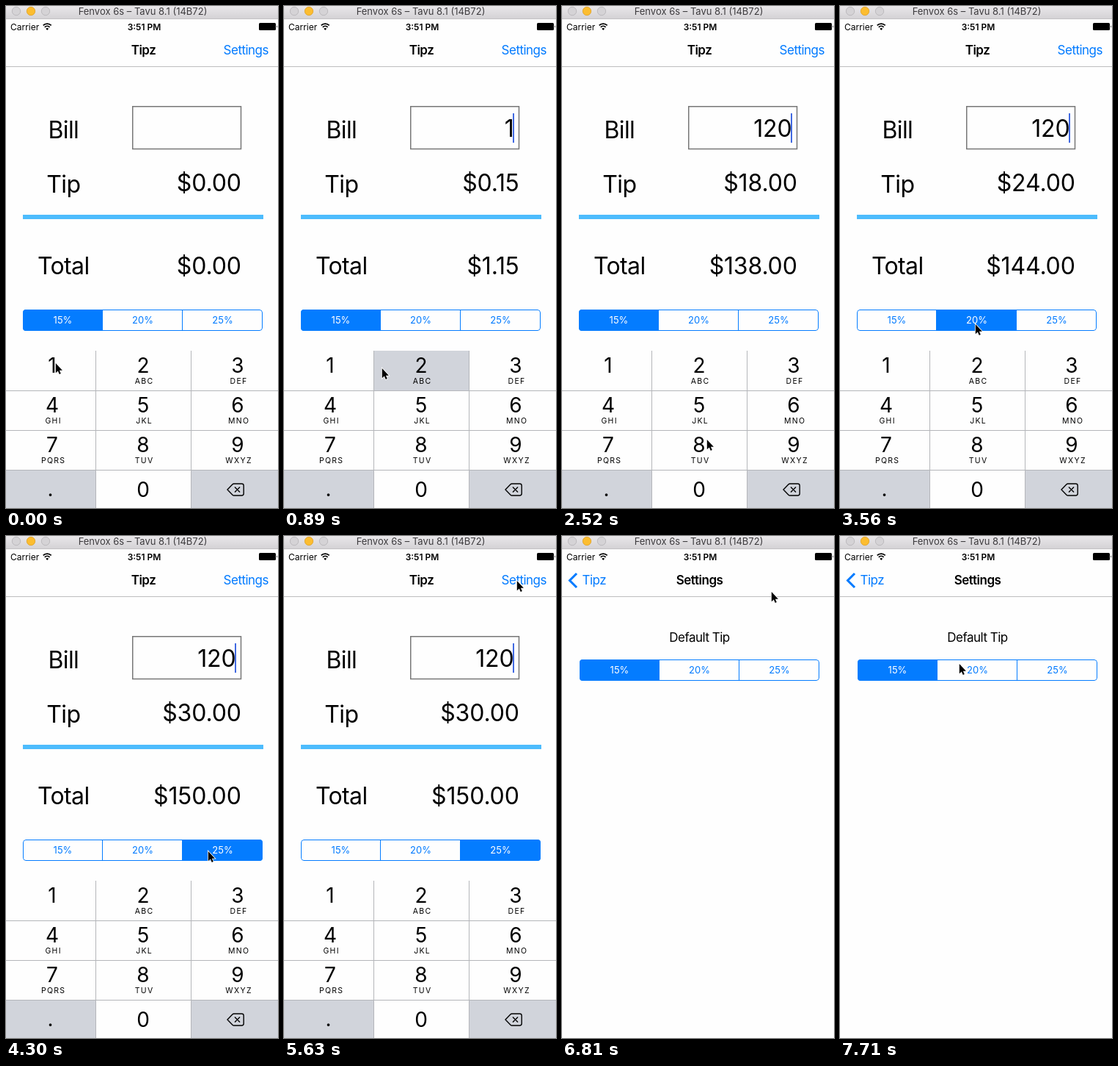
An HTML page that plays this animation: 371x683 px, repeating every 8000 ms.

```html
<!DOCTYPE html>
<html lang="en">
<head>
<meta charset="utf-8">
<title>Tip calculator</title>
<style>
  html, body { margin: 0; width: 100%; height: 100%; overflow: hidden; background: #fefefe; }
  svg { display: block; width: 100%; height: 100%; font-family: Inter, Roboto, sans-serif; }
  text { white-space: pre; }
  .mid { text-anchor: middle; }
  .end { text-anchor: end; }
  .big { font-size: 32px; letter-spacing: -.005em; }
  .big.mid { letter-spacing: -.02em; }
  .nav { font-size: 17px; letter-spacing: -.03em; }
  .bold { font-weight: 600; }
  .blue { fill: #007aff; }
  .small { font-size: 12px; }
  .seg text { font-size: 13px; text-anchor: middle; }
  .seg .line { fill: none; stroke: #047cff; }
  .digit { font-size: 28px; text-anchor: middle; }
  .letters { font-size: 10.5px; letter-spacing: 1.3px; text-anchor: middle; }
</style>
</head>
<body>
<svg viewBox="0 0 371 683">
  <defs>
    <linearGradient id="chrome" x2="0" y2="1">
      <stop stop-color="#e9e7ea"/><stop offset="1" stop-color="#d3d1d4"/>
    </linearGradient>
    <linearGradient id="edge">
      <stop stop-color="#000" stop-opacity="0"/><stop offset="1" stop-color="#000" stop-opacity=".32"/>
    </linearGradient>
    <clipPath id="pill"><rect width="327" height="29" rx="4"/></clipPath>
  </defs>
  <rect width="371" height="683" fill="#fefefe"/>

  <g id="home">
    <text class="big mid" x="78.3" y="180">Bill</text>
    <text class="big mid" x="78.3" y="254">Tip</text>
    <text class="big mid" x="78.3" y="365">Total</text>
    <rect x="172.75" y="136.75" width="147.75" height="57.75" fill="#fefefe" stroke="#777" stroke-width="1.5"/>
    <text class="big end" id="bill" x="313.5" y="178"></text>
    <rect id="caret" x="312" y="146" width="2" height="40" fill="#4169e1"/>
    <text class="big end" id="tip" x="320.7" y="251.5"></text>
    <text class="big end" id="total" x="320.7" y="365"></text>
    <rect x="23" y="284" width="328" height="6" fill="#4dbcfd"/>
    <g class="seg" id="rate" transform="translate(23 413)"></g>
    <rect id="dim" y="83" width="371" height="600" opacity="0"/>
    <g id="keypad"></g>
  </g>

  <g id="settings">
    <rect x="-9" y="83" width="9" height="600" fill="url(#edge)"/>
    <rect y="83" width="372" height="600" fill="#fefefe"/>
    <text class="nav mid" x="187.5" y="144">Default Tip</text>
    <g class="seg" id="preset" transform="translate(24 168)"></g>
  </g>

  <rect y="18" width="371" height="65" fill="#fefefe"/>
  <g id="navEdge">
    <rect x="-30" y="18" width="30" height="64" opacity=".05"/>
    <rect x="-9" y="18" width="9" height="64" fill="url(#edge)" opacity=".5"/>
  </g>
  <path d="M0 82.5H371" stroke="#bdbdbf"/>
  <text class="nav bold mid" id="homeTitle" x="187.5" y="66">Tipz</text>
  <text class="nav bold mid" id="setTitle" x="187.5" y="66">Settings</text>
  <text class="nav blue end" id="setButton" x="358" y="66">Settings</text>
  <g id="back">
    <path d="M20 51L10.5 60.5L20 70" fill="none" stroke="#007aff" stroke-width="3"/>
    <text class="nav blue" id="backText" x="27.5" y="66">Tipz</text>
  </g>

  <text class="small" x="6" y="32.5">Carrier</text>
  <g fill="none" stroke="#000" stroke-width="1.7">
    <path d="M50.7 26.4a7.8 7.8 0 0 1 11 0M52.8 28.8a4.9 4.9 0 0 1 6.8 0"/>
    <path d="M56.2 33l-2-2.2a3 3 0 0 1 4 0z" fill="#000" stroke="none"/>
  </g>
  <text class="small bold mid" x="188.5" y="32.5">3:51 PM</text>
  <rect x="345" y="23" width="23" height="10" rx="1.5"/>
  <path d="M369 26.3q1.6 1.7 0 3.4z"/>

  <rect width="371" height="18" fill="url(#chrome)"/>
  <path d="M0 17.5H371" stroke="#c4c2c5"/>
  <g stroke-width=".8">
    <circle cx="14" cy="7" r="5.7" fill="#d5d3d6" stroke="#b5b3b6"/>
    <circle cx="34" cy="7" r="5.7" fill="#fcbd30" stroke="#dfa023"/>
    <circle cx="54" cy="7" r="5.7" fill="#d5d3d6" stroke="#b5b3b6"/>
  </g>
  <text class="mid" x="186.5" y="12" font-size="13" fill="#3d3b3e">Fenvox 6s – Tavu 8.1 (14B72)</text>

  <path id="mouse" d="M.8 1V14.2L3.8 11.5L5.8 16L7.8 15.1L5.9 10.7H9.9Z" stroke="#fff" stroke-width="1.6" paint-order="stroke"/>
</svg>
<script>
const $ = id => document.getElementById(id);
const LOOP = 8000, STEP = LOOP / 54;
const RATES = [15, 20, 25];
const KEY_GRAY = '#d1d4db';

const path = [
  [0, 67, 485], [3, 67, 485], [6, 133, 492], [8, 133, 492],
  [12, 190, 664], [13, 193, 655], [16, 193, 655], [17, 197, 589],
  [21, 184, 432], [24, 184, 432], [27, 275, 428], [30, 275, 428],
  [38, 317, 60], [45, 317, 60], [49, 113, 154], [50, 113, 154], [52, 162, 173]
];
const bills = [[0, ''], [2, '1'], [7, '12'], [13, '120']];
const choices = [[0, 0], [23, 1], [28, 2]];
const caretFlips = [1, 4, 6, 10, 12, 18, 22, 26, 28, 32, 35, 39];
const PUSH = 42;

const latest = (list, step) => list.filter(([at]) => at <= step).pop()[1];
const smooth = k => k * k * (3 - 2 * k);

function buildSegments(group) {
  group.innerHTML = '<rect class="on" width="109" height="29" fill="#047cff"/>' +
    '<rect class="line" x=".5" y=".5" width="326" height="28" rx="3.5"/>' +
    '<path class="line" d="M108.5 0V29M217.5 0V29"/>' +
    RATES.map((r, i) => `<text x="${54.5 + i * 109}" y="19">${r}%</text>`).join('');
  group.setAttribute('clip-path', 'url(#pill)');
}

function select(group, index) {
  group.querySelector('.on').setAttribute('x', index * 109);
  group.querySelectorAll('text').forEach((t, i) =>
    t.setAttribute('fill', i === index ? '#fff' : '#007aff'));
}

function buildKeypad() {
  const letters = ['', 'ABC', 'DEF', 'GHI', 'JKL', 'MNO', 'PQRS', 'TUV', 'WXYZ'];
  const centers = [63, 187, 316], edges = [0, 122, 252, 371];
  let out = '<rect y="469" width="371" height="214" fill="#fefefe"/>';
  for (let i = 0; i < 12; i++) {
    const col = i % 3, row = Math.floor(i / 3), y = 469 + row * 54, x = centers[col];
    const side = row === 3 && col !== 1;
    out += `<rect id="key${i + 1}" x="${edges[col]}" y="${y}" width="${edges[col + 1] - edges[col]}" height="54" fill="${side ? KEY_GRAY : '#fefefe'}"/>`;
    if (row < 3) {
      out += `<text class="digit" x="${x}" y="${y + 30}">${i + 1}</text>` +
        `<text class="letters" x="${x + 1.6}" y="${y + 45}">${letters[i]}</text>`;
    }
  }
  out += '<text class="digit" x="60.5" y="667">.</text><text class="digit" x="187" y="668">0</text>' +
    '<path d="M0 523.5H371M0 577.5H371M0 631.5H371M122.5 469V683M252.5 469V683" stroke="#b4b6ba" fill="none"/>' +
    '<path d="M302 658l7-7.2q.8-.8 2-.8h10.5q2.7 0 2.7 2.7v10.6q0 2.7-2.7 2.7H311q-1.2 0-2-.8zM312 654.5l7 7M319 654.5l-7 7" fill="none" stroke="#000" stroke-width="1.4"/>';
  $('keypad').innerHTML = out;
}

function mouseAt(step) {
  const next = path.findIndex(p => p[0] > step);
  if (next < 0) return path[path.length - 1].slice(1);
  const [t0, x0, y0] = path[next - 1], [t1, x1, y1] = path[next];
  const k = smooth((step - t0) / (t1 - t0));
  return [x0 + (x1 - x0) * k, y0 + (y1 - y0) * k];
}

const shift = (id, x, y = 0) => $(id).setAttribute('transform', `translate(${x} ${y})`);
const fade = (id, value) => $(id).setAttribute('opacity', value);

function draw(step) {
  const bill = latest(bills, step), choice = latest(choices, step);
  const tip = bill * RATES[choice] / 100;
  $('bill').textContent = bill;
  $('tip').textContent = '$' + tip.toFixed(2);
  $('total').textContent = '$' + (+bill + tip).toFixed(2);
  fade('caret', caretFlips.filter(s => s <= step).length % 2);
  select($('rate'), choice);
  $('key1').setAttribute('fill', step === 1 ? KEY_GRAY : '#fefefe');
  $('key2').setAttribute('fill', step === 6 ? KEY_GRAY : '#fefefe');

  const pushed = step >= PUSH;
  const left = pushed ? Math.round(22 * Math.exp(-2.1 * (step - PUSH))) : 371;
  const rest = left / 22;
  shift('home', pushed ? Math.round(-.3 * (371 - left)) : 0);
  fade('dim', pushed ? .1 : 0);
  $('rate').querySelectorAll('.line').forEach(l => l.style.stroke = pushed ? '#555' : '');
  shift('settings', left);
  shift('navEdge', left);
  fade('settings', +pushed);
  fade('navEdge', pushed && left ? 1 : 0);
  fade('homeTitle', +!pushed);
  fade('setTitle', +pushed);
  shift('setTitle', pushed ? 12 * rest : 0);
  fade('setButton', pushed ? .08 * rest : step === 39 ? .3 : 1);
  fade('back', pushed ? 1 - .65 * rest : 0);
  shift('backText', pushed ? 7 * rest : 0);
  shift('mouse', ...mouseAt(step).map(Math.round));
}

let shown = -1;
function tick(now) {
  const step = Math.floor((now % LOOP + 13) / STEP) % 54;
  if (step !== shown) draw(shown = step);
  requestAnimationFrame(tick);
}

buildSegments($('rate'));
buildSegments($('preset'));
select($('preset'), 0);
buildKeypad();
draw(0);
requestAnimationFrame(tick);
</script>
</body>
</html>
```
